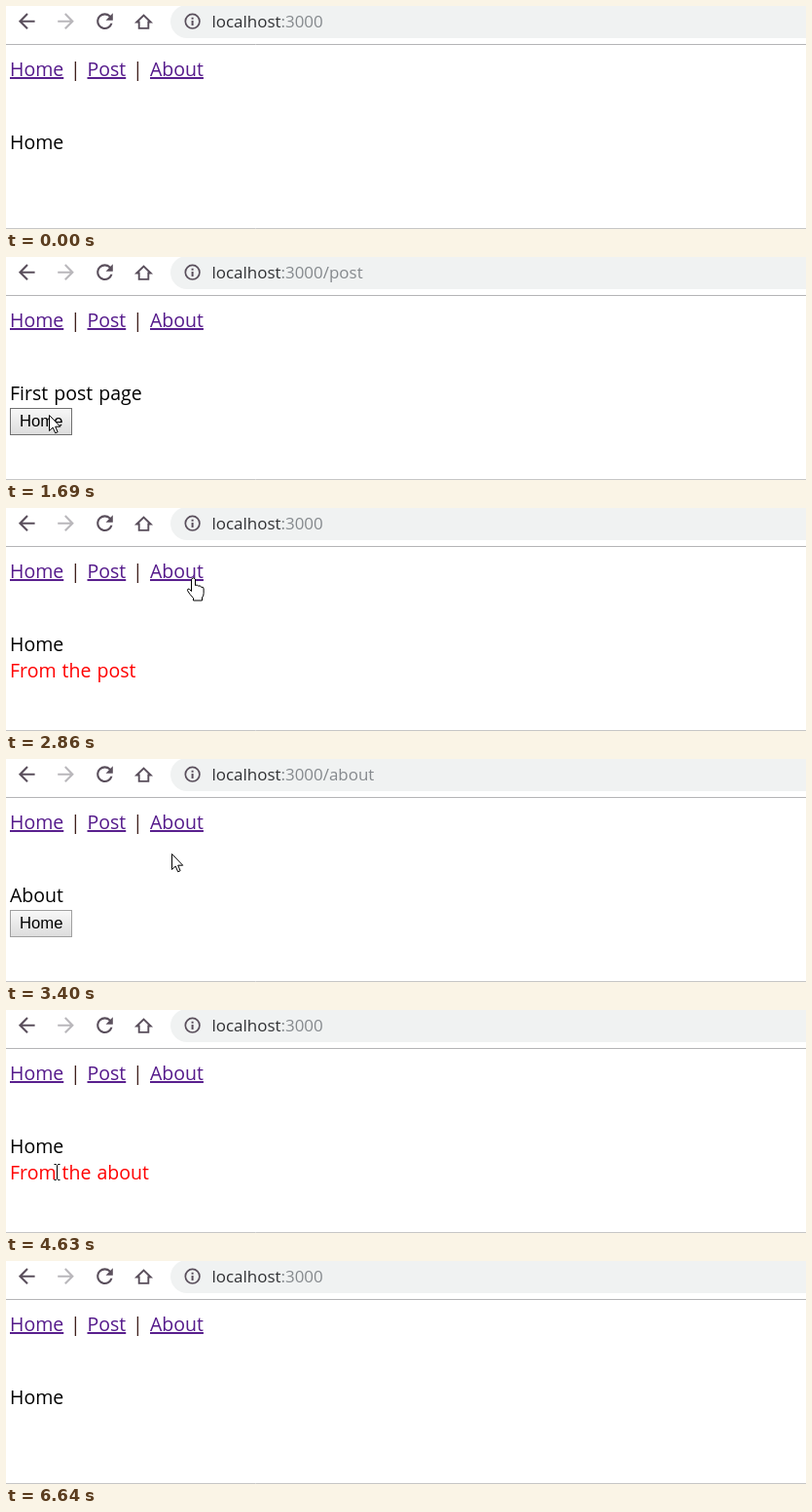
Recreate the animation shown at these times as an HTML page. Size 822 px wide and 229 px high, loop 7.42 s.

```html
<!DOCTYPE html>
<html lang="en">
<head>
<meta charset="utf-8">
<title>Router demo</title>
<style>
  html, body { margin: 0; width: 100%; height: 100%; overflow: hidden; background: #fff; }
  svg { display: block; width: 822px; height: 229px; }
  text { font: 19.5px "Open Sans", "Noto Sans", sans-serif; word-spacing: 1px; white-space: pre; }
  .link { fill: #551a8b; text-decoration: underline; }
  .link.active { fill: #f00; }
  .url { font-size: 16.95px; fill: #85898d; }
  .host { fill: #303134; }
  #button text { font: 16.67px "Liberation Sans", Arial, sans-serif; }
  .cursor { fill: #fff; stroke: #000; stroke-linejoin: round; }
</style>
</head>
<body>
<svg viewBox="0 0 822 229">
  <defs>
    <linearGradient id="face" x2="0" y2="1">
      <stop stop-color="#f8f8f8"/><stop offset="1" stop-color="#dcdcdc"/>
    </linearGradient>
    <path id="back" d="M20 11H7.83l5.59-5.59L12 4l-8 8 8 8 1.41-1.41L7.83 13H20z"/>
  </defs>

  <rect x="169" y="-1" width="700" height="34" rx="17" fill="#f0f2f2"/>
  <g fill="#5a4f5c">
    <use href="#back" transform="translate(8.8 3.2) scale(1.04)"/>
    <use href="#back" transform="translate(74 3.2) scale(-1.04 1.04)" fill="#b9b7bb"/>
    <path transform="translate(89 3.2) scale(1.04)" d="M17.65 6.35A7.96 7.96 0 0 0 12 4a8 8 0 1 0 7.73 10h-2.08A6 6 0 1 1 12 6c1.66 0 3.14.69 4.22 1.78L13 11h7V4z"/>
    <path d="M190.6 15h2v5h-2zM190.6 11.7h2v2h-2z"/>
  </g>
  <g fill="none" stroke="#5a4f5c" stroke-width="1.9">
    <path d="M134.3 16.5L141.5 9.6l7.2 6.9h-2.4v6.4h-9.6v-6.4z"/>
    <circle cx="191.6" cy="15.7" r="7.3" stroke-width="1.7"/>
  </g>
  <text class="url" x="211.5" y="22"><tspan class="host">localhost</tspan>:3000<tspan id="path"></tspan></text>
  <path d="M0 39.5H822" stroke="#b4b4b6"/>
  <path d="M0 228.5H822" stroke="#c6c6c6"/>

  <text class="link" x="4" y="72">Home</text>
  <text class="link" x="83.5" y="72">Post</text>
  <text class="link" x="148" y="72">About</text>
  <g text-anchor="middle" fill="#40201c">
    <text x="71.3" y="72">|</text>
    <text x="135.3" y="72">|</text>
  </g>

  <text id="title" x="4" y="147"></text>
  <text id="note" x="4" y="174" fill="#f00"></text>
  <g id="button">
    <rect id="box" x="4.5" y="155.5" width="63" height="27" fill="url(#face)"/>
    <text x="14" y="174">Home</text>
  </g>

  <path class="cursor" id="arrow" d="M0 0V16L3.7 12.6 6.2 18.3 8.6 17.2 6.2 11.7H11.2Z"/>
  <path class="cursor" id="hand" d="M-2 14V1.5Q0-1 2 1.5V8Q4.2 6.6 5 8.7 7.3 7.4 8 9.8 10.6 9 10.6 11.5V16Q10.6 19 9 20.5V23.5H0V21Q-4 17-6 13.3-6 10.6-4 11.8Z"/>
  <path class="cursor" id="beam" d="M-3-8H-1L0-7 1-8H3M-3 8H-1L0 7 1 8H3M0-7V7"/>
</svg>
<script>
const LOOP = 7420, TICK = 77, PRESS = 80, ENTER = 70, LEAVE = 6640;
const $ = id => document.getElementById(id);
const links = [...document.querySelectorAll('.link')];

const clicks = [[850, 'Post'], [2000, 'Button'], [3240, 'About'], [4090, 'Button'], [5790, 'Home']];

// start time, ticks, destination
const moves = [
  [ENTER, 9, 102, 71], [1310, 6, 44, 162], [2480, 6, 192, 71], [3240, 3, 170, 97],
  [3470, 7, 52, 166], [4700, 7, 33, 71], [6480, 2, 423, 200]
];

function pageAt(t) {
  let page = 'Home', from = '';
  for (const [time, target] of clicks) {
    if (time > t) break;
    from = target === 'Button' ? page : '';
    page = target === 'Button' ? 'Home' : target;
  }
  return [page, from.toLowerCase()];
}

function pointer(t) {
  let x = 561, y = 228;
  for (const [start, ticks, toX, toY] of moves) {
    if (start > t) break;
    const u = Math.min(1, Math.floor((t - start) / TICK + 1.13) / ticks);
    const ease = u * u * (3 - 2 * u);
    x += (toX - x) * ease;
    y += (toY - y) * ease;
  }
  return [Math.round(x), Math.round(y)];
}

function over(el, x, y) {
  const left = +el.getAttribute('x'), base = +el.getAttribute('y');
  return x >= left && x <= left + el.getComputedTextLength() && y > base - 19 && y < base + 7;
}

function draw(t) {
  const [page, from] = pageAt(t);
  const home = page === 'Home';
  $('path').textContent = home ? '' : '/' + page.toLowerCase();
  $('title').textContent = page === 'Post' ? 'First post page' : page;
  $('note').textContent = from && 'From the ' + from;
  $('button').style.display = home ? 'none' : '';

  const press = clicks.find(([time]) => t >= time - PRESS && t < time);
  for (const el of links) el.classList.toggle('active', !!press && press[1] === el.textContent);

  const [x, y] = pointer(t);
  const shape = t < ENTER || t >= LEAVE ? ''
    : links.some(el => over(el, x, y)) ? 'hand'
    : over($('title'), x, y) || over($('note'), x, y) ? 'beam' : 'arrow';
  for (const id of ['arrow', 'hand', 'beam']) {
    $(id).style.display = id === shape ? '' : 'none';
    $(id).setAttribute('transform', `translate(${x + 0.5} ${y + 0.5})`);
  }
  const hover = x >= 4 && x <= 68 && y >= 155 && y <= 183;
  $('box').setAttribute('stroke', hover ? '#707070' : '#a0a0a0');
}

function frame() {
  draw(performance.now() % LOOP);
  requestAnimationFrame(frame);
}
frame();
</script>
</body>
</html>
```
